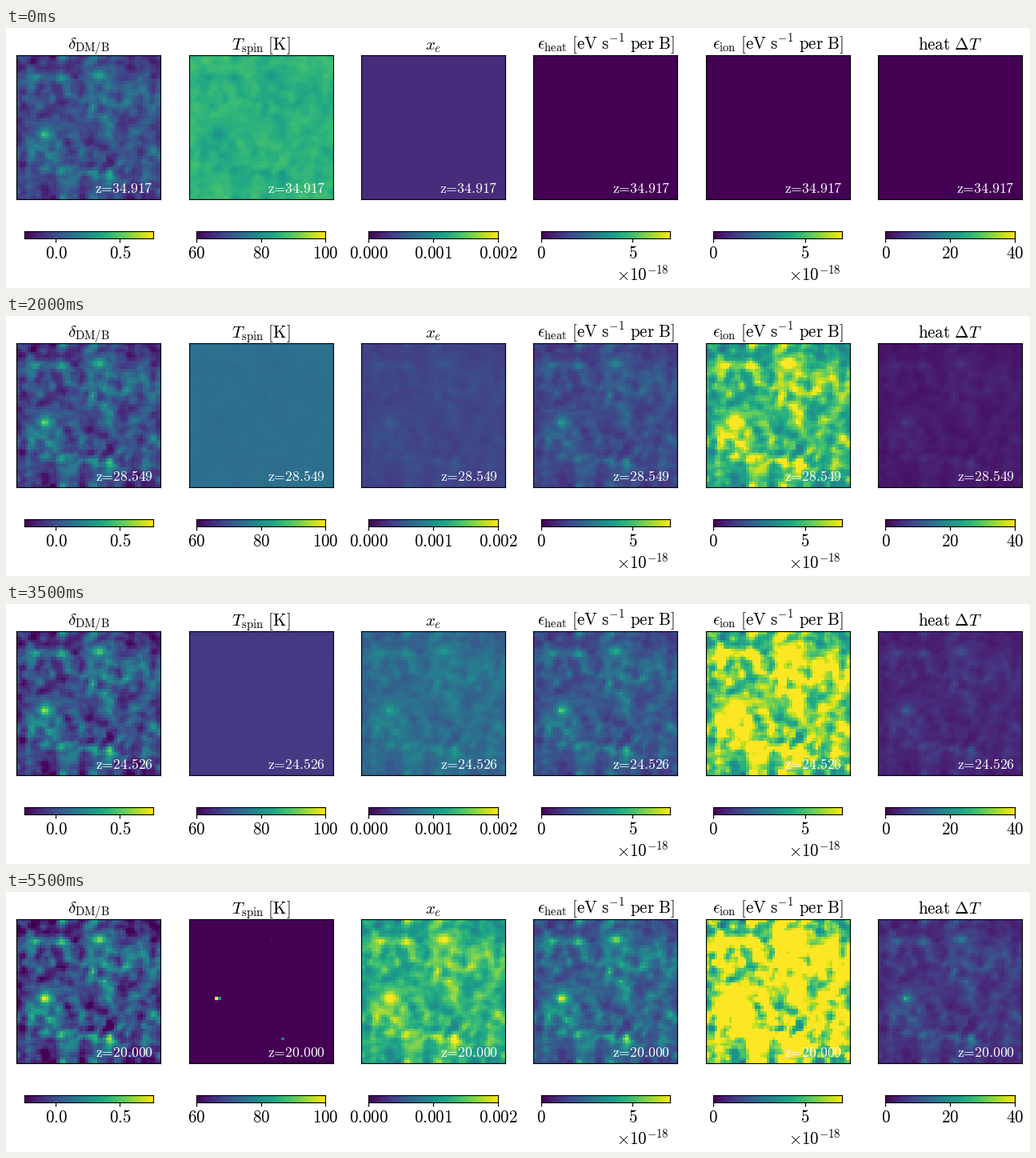
A matplotlib script for the animation above (7000 ms loop, 1280 px wide and 325 px high).

```python
import numpy as np
import matplotlib.pyplot as plt
from matplotlib.animation import FuncAnimation

W, H, DPI = 1280, 325, 100
N = 50            # cells per side
LAST = 11         # final redshift snapshot
HOLD = 2          # extra ticks on the last one

plt.rcParams["mathtext.fontset"] = "cm"

fig = plt.figure(figsize=(W / DPI, H / DPI), dpi=DPI, facecolor="white")


def add_axes(x, y, w, h):
    ax = fig.add_axes([x / W, 1 - (y + h) / H, w / W, h / H])
    for spine in ax.spines.values():
        spine.set_linewidth(0.85)
    ax.set_xticks([])
    ax.set_yticks([])
    return ax


def label(x, y, s, px, ha="center", color="black"):
    return fig.text(x / W, 1 - y / H, s, fontsize=px * 72 / DPI,
                    ha=ha, va="baseline", color=color)


# Main halos and one void: x, y in cells, central overdensity
HALOS = [(9.8, 27.6, 0.95), (29, 7.2, 0.75), (30.5, 21.5, 0.5), (31.5, 27, 0.4),
         (44, 12, 0.4), (46, 23, 0.3), (18, 45, 0.3), (31, 36, -0.25)]


def density():
    """Overdensity at z = 20: halos on a seeded random field."""
    yy, xx = np.mgrid[:N, :N] + 0.5
    halos = sum(a * np.exp(-np.hypot(xx - x, yy - y) / 2.6) for x, y, a in HALOS)

    k = np.hypot(*np.meshgrid(np.fft.fftfreq(N), np.fft.fftfreq(N)))
    spectrum = np.exp(-(k / 0.3) ** 2) / (k + 0.05) ** 0.8
    white = np.random.default_rng(21).standard_normal((N, N))
    noise = np.fft.ifft2(np.fft.fft2(white) * spectrum).real
    noise = np.exp(0.14 * (noise - noise.mean()) / noise.std()) - 1
    return halos - halos.mean() + noise * (1 - halos / halos.max())


D20 = density()
PEAK = (D20 / 0.9).clip(0, 1.1) ** 10


def fields(step):
    """Redshift and the six maps of one snapshot."""
    p = step / LAST
    grow = 1.05 ** (LAST - step)
    x = 21 * (grow - 1)
    d = D20 / grow
    gas = (1 + d) ** 2
    heat = 450 * p ** 10 * PEAK

    t_spin = 57 + 2.25 * x - 0.022 * x ** 2 - 14 * (1 - p) ** 4 * d + heat
    x_e = 0.00025 + 0.00106 * p ** 1.8 * (1 + 1.3 * D20)
    e_heat = 2.3 * p ** 0.34 * gas
    e_ion = 6.8 * p ** 0.34 * gas
    d_t = 6.6 * p ** 0.8 * gas + 0.04 * heat
    return 21 * grow - 1 + 1e-9, [d, t_spin, x_e, e_heat, e_ion, d_t]


UNIT = r"\ \mathrm{[eV\ s^{-1}\ per\ B]}$"
PANELS = [  # title, range, ticks, tick format, exponent shown
    (r"$\delta_\mathrm{DM/B}$", (-0.25, 0.76), (0, 0.5), "%.1f", False),
    (r"$T_\mathrm{spin}\ \mathrm{[K]}$", (60, 100), (60, 80, 100), "%d", False),
    (r"$x_e$", (0, 0.002), (0, 0.001, 0.002), "%.3f", False),
    (r"$\epsilon_\mathrm{heat}" + UNIT, (0, 7.04), (0, 5), "%d", True),
    (r"$\epsilon_\mathrm{ion}" + UNIT, (0, 7.04), (0, 5), "%d", True),
    (r"$\mathrm{heat}\ \Delta T$", (0, 40), (0, 20, 40), "%d", False),
]

SIDE, PITCH, BAR = 179.9, 215.36, 161.5
images, stamps = [], []
ramp = np.linspace(0, 1, 256)[None, :]
for i, (title, (lo, hi), ticks, fmt, power) in enumerate(PANELS):
    left = 13.3 + PITCH * i
    ax = add_axes(left, 34.3, SIDE, SIDE)
    images.append(ax.imshow(np.zeros((N, N)), cmap="viridis", vmin=lo, vmax=hi,
                            interpolation="nearest", aspect="auto"))
    label(left + SIDE / 2 + 0.3, 27, title, 21)
    stamps.append(label(left + 170.7, 205.5, "", 17.7, "right", "white"))

    x0 = left + (SIDE - BAR) / 2
    bar = add_axes(x0, 254.4, BAR, 9)
    bar.imshow(ramp, cmap="viridis", aspect="auto", extent=(lo, hi, 0, 1))
    bar.set_xticks(ticks, [""] * len(ticks))
    bar.tick_params(length=3.5, width=0.85)
    for t in ticks:
        label(x0 + 0.4 + BAR * (t - lo) / (hi - lo), 288, "$" + fmt % t + "$", 21)
    if power:
        label(x0 + BAR - 1.5, 315, r"$\times 10^{-18}$", 21, "right")


def update(tick):
    z, maps = fields(min(tick, LAST))
    for im, data, stamp in zip(images, maps, stamps):
        im.set_data(data)
        stamp.set_text(r"$\mathrm{z}\hspace{-0.2}=\hspace{-0.2}%.3f$" % z)
    return images + stamps


anim = FuncAnimation(fig, update, frames=LAST + 1 + HOLD, interval=500,
                     repeat=True, repeat_delay=0, blit=False)
plt.show()
```
